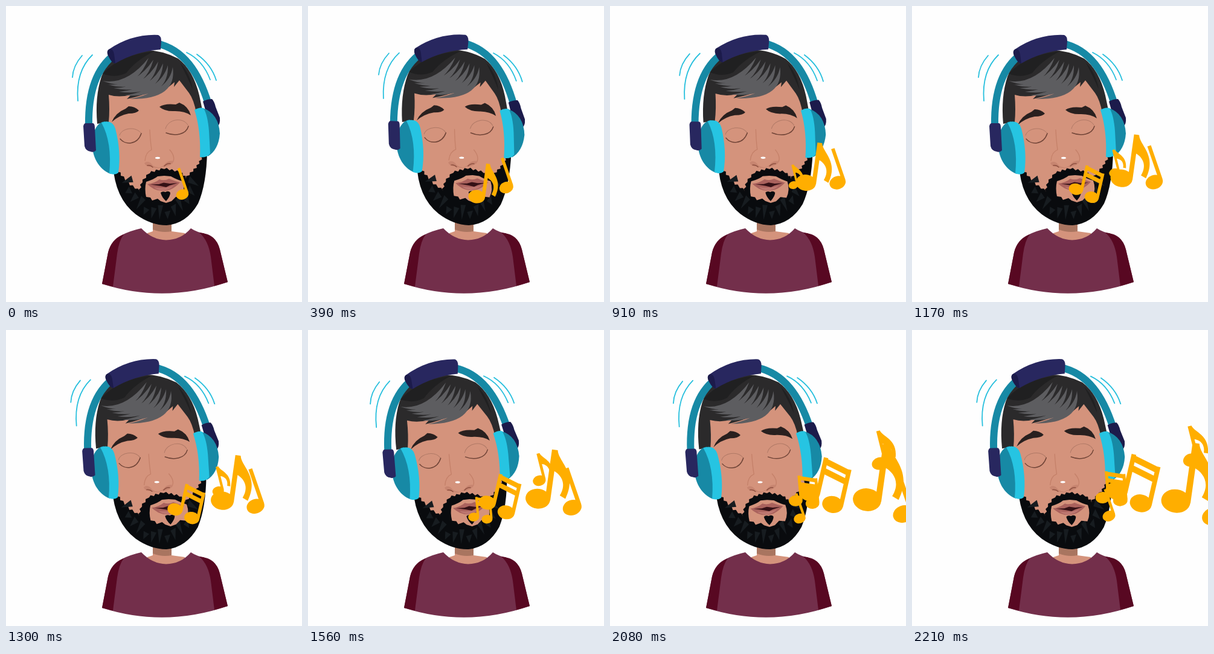
An HTML page for the animation above (2.34 s loop, 490 by 490 pixels).

```html
<!DOCTYPE html>
<html lang="en">
<head>
<meta charset="utf-8">
<title>Whistling along</title>
<style>
html, body { margin: 0; width: 100%; height: 100%; overflow: hidden; background: #fefefe; }
svg { display: block; width: 100vw; height: 100vh; }
.line { fill: none; stroke-linecap: round; }
</style>
</head>
<body>
<svg viewBox="0 0 490 490">
  <!-- neck and shirt -->
  <path fill="#d4937c" d="M243 355H274V373L296 376V392H234V376L243 373Z"/>
  <path fill="#a97560" d="M243 355H274V373Q258 376 243 370Z"/>
  <path fill="#732f4b" d="M159 460L169 408Q174 387 192 379Q206 372 224 368Q242 387 265 387.500Q290 387 306 368Q316 375 334 378Q349 384 354 403L367 457Q262 493 159 460Z"/>
  <path fill="#580822" d="M159 460L169 408Q174 387 195 378Q187 388 184 410L177 464.500Z"/>
  <path fill="#580822" d="M320 375Q348 378 354 403L367 457L345 463.500L339 415Q335 388 320 375Z"/>

  <g id="head">
    <path class="line" stroke="#26bfdd" stroke-width="1.800" d="M126 82Q111 99 110 118M143 81Q115 108 119 157M299 77Q326 90 338 122M316 80Q340 97 348 123"/>
    <path fill="#d4937c" d="M165 130Q230 95 310 125L324 180L331 260Q318 345 265 350Q195 340 179 270L168 200Z"/>

    <!-- hair -->
    <path fill="#2b2a2b" d="M151 195Q147 150 158 117Q168 88 200 77Q245 66 285 87Q310 106 320 148L325 172L315 177Q311 155 303 144L287 123L278 134L279 126Q262 142 238 149L247 139Q225 149 200 154L207 147Q187 152 170 147Q172 172 170 192Z"/>
    <path fill="#202021" d="M160 112Q190 80 245 75Q215 90 199 111Q180 120 160 112ZM288 94Q305 112 309 138Q302 121 288 94Z"/>
    <path id="locks" fill="#5d5d60"/>

    <!-- eyes and nose -->
    <path class="line" stroke="#b07966" d="M188 214C191 202 215 198 224 211M264 203C268 187 293 183 301 197"/>
    <path class="line" stroke="#704437" stroke-width="1.500" d="M189 220C197 230 217 231 224 211M265 210C280 216 298 213 302 199"/>
    <path class="line" stroke="#c48069" stroke-width="1.300" d="M238 205Q239 225 241 238Q231 242 230 256M271 238Q282 251 275 260"/>
    <path fill="#c78570" d="M229 260Q236 254 243 264Q253 271 262 263Q268 254 278 257Q272 266 260 266Q250 271 241 266Q232 267 229 260Z"/>
    <path class="line" stroke="#8f5141" stroke-width="1.500" d="M234 264Q239 263 243 267M262 265Q267 260 272 261"/>
    <ellipse cx="251" cy="251.500" rx="4" ry="1.700" fill="#fff"/>

    <path id="brows" fill="#29201f" d="M175 192Q181 177 198 170L203 166Q213 166 220 173Q216 178 203 178Q187 181 175 192ZM254 167Q262 161 281 163L287 160Q302 166 306 181Q296 174 280 174Q263 175 254 167Z"/>

    <path id="beard" fill="#090b0e"/>
    <path id="tufts" fill="#171c20"/>

    <g id="mouth">
      <path fill="#d4937c" d="M232 291Q245 287 251 282L262 281L273 282Q284 288 292 290Q297 304 291 317L281 316L274 323L265 326L256 323L251 319L242 322L239 317L232 316Q229 303 232 291Z"/>
      <path fill="#aa625d" d="M234 295Q247 293 254 287Q262 290 270 286Q280 290 288 292Q281 300 272 304Q258 309 245 303Q238 299 234 295Z"/>
      <path fill="#bd7770" d="M245 300Q261 303 278 297Q272 304 260 306Q250 305 245 300Z"/>
      <path fill="#351116" d="M239 295.500L253 295L261 292.500L271 294L284 293L271 297L265 300L256 298Z"/>
      <path fill="#090b0e" d="M256 309Q259 306 264 308Q269 305 272 309Q272 315 265 323Q258 317 256 309Z"/>
    </g>

    <!-- headphones -->
    <path class="line" stroke="#1789a5" stroke-width="12" d="M137 197C136 144 148 104 180 80M250 62C294 72 319 110 335 162"/>
    <path fill="#28275f" d="M170 72Q208 46 252 48Q257 50 257 58L256 72Q215 75 181 95Q176 96 169 82Q166 75 170 72Z"/>
    <path fill="#1c1b4b" d="M170 72Q177 69 179 80L181 95Q176 96 169 82Q166 75 170 72Z"/>
    <path fill="#1789a5" d="M164 191C137 193 131 261 173 278L182 240Z"/>
    <path fill="#26c4e2" d="M158 193Q176 187 181 203Q191 241 186 276Q180 281 171 277Q176 226 158 193Z"/>
    <path fill="#28275f" d="M132 194H144Q147 195 147 201L149 239Q145 243 140 241Q132 240 130 232L128 199Q129 194 132 194Z"/>
    <path fill="#1c1b4b" d="M326 158Q333 154 341 154Q345 158 347 167L354 185Q355 196 350 199L334 186Z"/>
    <path fill="#1789a5" d="M326 169Q352 178 354 211Q352 238 334 249Z"/>
    <path fill="#26c4e2" d="M312 172Q320 167 327 169Q334 181 336 207L338 244Q332 252 321 250Q323 207 312 172Z"/>
  </g>
  <g id="notes" fill="#ffae00"></g>
</svg>
<script>
const LOOP = 2340, STEP = 130;
const $ = id => document.getElementById(id);
const list = (n, make) => Array.from({ length: n }, (_, i) => make(i)).join('');
const mix = (a, b, p) => a + (b - a) * p;

// Saw-toothed line through a few points
function jag(points, depth) {
  return points.slice(1).map(([x, y], i) => {
    const [px, py] = points[i], dx = x - px, dy = y - py, len = Math.hypot(dx, dy);
    const teeth = Math.max(1, Math.round(len / 9));
    return list(teeth, k => {
      const p = (k + .6) / teeth, q = (k + 1) / teeth;
      return `L${px + dx * p - dy / len * depth} ${py + dy * p + dx / len * depth}L${px + dx * q} ${py + dy * q}`;
    });
  }).join('');
}

$('beard').setAttribute('d', 'M177 262Q180 318 215 345Q240 363 266 363Q299 360 318 327Q332 295 333 240' + jag([
  [333, 240], [316, 268], [298, 286], [288, 276], [262, 270], [238, 277],
  [226, 292], [222, 308], [205, 297], [190, 281], [177, 262]], 3) + 'Z');

// Tapered strands that follow the jaw
$('tufts').setAttribute('d', list(13, i => {
  const at = (a, k) => `${256 + 72 * k * Math.cos(a)} ${262 + 97 * k * Math.sin(a)}`;
  const a = mix(.35, 2.75, i / 12), root = .7 + .06 * (i % 3);
  return `M${at(a - .06, root)}L${at(a + .05, .95)}L${at(a + .11, root)}Z`;
}));

// Crescents swept across the fringe
$('locks').setAttribute('d', list(6, i => {
  const start = `${160 + 9 * i} ${124 + 6 * i}`, cx = 200 + 14 * i, cy = 131 + 2 * i;
  return `M${start}Q${cx} ${cy} ${236 + 8 * i} ${86 + 3 * i}Q${cx + 14} ${cy + 14} ${start}Z`;
}));

// Note shapes, measured in head radii
const oval = (x, y) => `M${x - 1} ${y}a1 .8 0 1 1 2 0a1 .8 0 1 1 -2 0Z`;
const stem = (x, y, h) => `M${x + .58} ${y}v${-h}h.43v${h}Z`;
const beam = y => `M.58 ${y}l2.820 .680v.580l-2.820 -.680Z`;
const plain = oval(0, 0) + stem(0, 0, 4.1);
const flagged = plain + 'M.580 -4.100H1.050C1.200 -3.200 2.950 -2.500 2.200 -.300L1.720 -.500C2.200 -1.600 1.500 -2.200 1 -2.400Z';
const pair = oval(0, 0) + oval(2.4, .6) + stem(0, 0, 3.6) + stem(2.4, .6, 3.6) + beam(-3.6) + beam(-2.7);

// Each note drifts from the mouth to its last place: [x, y, head radius]
const notes = [
  { shape: plain, turn: -19, born: 0, from: [292, 312, 10.5], to: [510, 313, 18.5], arc: 21 },
  { shape: flagged, turn: 8, born: 260, from: [268, 323, 13], to: [448, 286, 25], arc: 22 },
  { shape: flagged, turn: -14, born: 650, from: [272, 319, 7], to: [478, 210, 14], arc: 11 },
  { shape: pair, turn: 13, born: 1040, from: [263, 310, 11], to: [347, 264, 19], arc: 6 },
  { shape: pair, turn: -5, born: 1430, from: [266, 318, 8.5], to: [324, 273, 12.5], arc: 4 },
  { shape: plain, turn: -19, born: 2080, from: [314, 312, 10], to: [338, 304, 11.5], arc: 0 }
];
for (const note of notes) {
  note.el = document.createElementNS('http://www.w3.org/2000/svg', 'path');
  note.el.setAttribute('d', note.shape);
  $('notes').append(note.el);
}

const place = (el, transform) => el.setAttribute('transform', transform);

function draw() {
  const t = Math.floor(performance.now() % LOOP / STEP) * STEP;
  place($('head'), `rotate(${1.8 * Math.sin(2 * Math.PI * t / LOOP)} 268 372)`);

  const whistling = (t >= 260 && t < 780) || (t >= 1170 && t < 2080);
  place($('mouth'), whistling ? 'translate(8 -1)' : '');
  const frown = Math.max(0, Math.sin(Math.PI * (t - 520) / 1300));
  place($('brows'), `translate(0 ${5 * frown})`);

  for (const { el, turn, born, from, to, arc } of notes) {
    el.style.display = t < born ? 'none' : '';
    const p = (t - born) / (LOOP - born);
    const [x, y, r] = from.map((v, i) => mix(v, to[i], p));
    place(el, `translate(${x} ${y - arc * 4 * p * (1 - p)}) rotate(${turn}) scale(${Math.max(0, r)})`);
  }
  requestAnimationFrame(draw);
}
draw();
</script>
</body>
</html>
```
